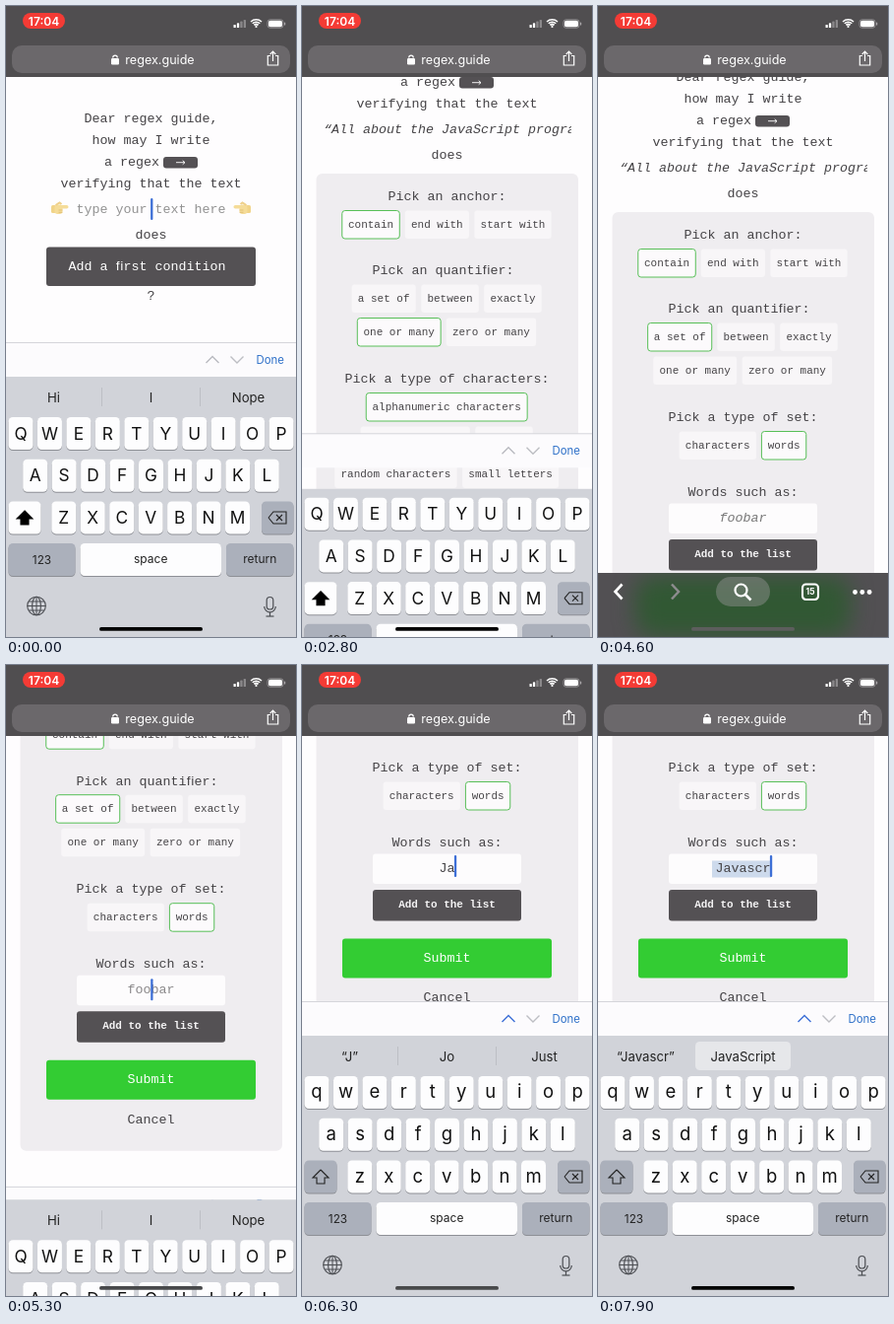
Recreate the animation shown at these times as an HTML page with a canvas. Size 295 by 640 pixels, loop 8 s.

```html
<!DOCTYPE html>
<html lang="en">
<head>
<meta charset="utf-8">
<title>Regex guide</title>
<style>
html, body { margin: 0; width: 100%; height: 100%; overflow: hidden; background: #fff; }
canvas { display: block; width: 295px; height: 640px; }
</style>
</head>
<body>
<canvas id="stage"></canvas>
<script>
const W = 295, H = 640, LOOP = 8000, MID = 147.5;
const MONO = '"Liberation Mono", "Courier New", monospace';
const SANS = 'Inter, "Liberation Sans", sans-serif';
const INK = '#454346', DARK = '#545154', GREEN = '#33cc33', BLUE = '#3d6fd6';
const canvas = document.getElementById('stage');
const dpr = window.devicePixelRatio || 1;
canvas.width = W * dpr;
canvas.height = H * dpr;
const c = canvas.getContext('2d');

const clamp = v => Math.min(1, Math.max(0, v));
function ease(t, from, to) {
  const p = clamp((t - from) / (to - from));
  return p * p * (3 - 2 * p);
}
const mix = (a, b, p) => a + (b - a) * p;

function box(x, y, w, h, r, fill, stroke, lw = 1) {
  c.beginPath();
  c.roundRect(x, y, w, h, r);
  if (fill) { c.fillStyle = fill; c.fill(); }
  if (stroke) { c.strokeStyle = stroke; c.lineWidth = lw; c.stroke(); }
}
function line(points, color, lw, fill) {
  c.beginPath();
  for (let i = 0; i < points.length; i += 2) c.lineTo(points[i], points[i + 1]);
  if (fill) { c.closePath(); c.fillStyle = fill; c.fill(); }
  if (color) { c.strokeStyle = color; c.lineWidth = lw; c.stroke(); }
}
function arc(x, y, r, from, to, color, lw) {
  c.beginPath();
  c.arc(x, y, r, from, to);
  c.strokeStyle = color;
  c.lineWidth = lw;
  c.stroke();
}
function dot(x, y, r, color) {
  c.beginPath();
  c.arc(x, y, r, 0, 7);
  c.fillStyle = color;
  c.fill();
}
function text(s, x, y, font, color, align) {
  c.font = font;
  c.fillStyle = color;
  c.textAlign = align || 'center';
  c.fillText(s, x, y);
}
const mono = (s, x, y, color = INK, style = '', size = 13.33, align) =>
  text(s, x, y + size * 0.29, `${style} ${size}px ${MONO}`, color, align);
const sans = (s, x, y, size, color, weight = 400) =>
  text(s, x, y + size * 0.36, `${weight} ${size}px ${SANS}`, color);
const caret = (x, y) => box(x - 1.1, y - 11, 2.3, 22, 1, BLUE);

// ---- timeline ----
const TYPED = [[5800, 'J'], [6200, 'Ja'], [6600, 'Jav'], [6900, 'Java'],
  [7200, 'Javas'], [7450, 'Javasc'], [7700, 'Javascr']];
const HINTS = [[0, ['Hi', 'I', 'Nope']], [5950, ['“J”', 'Jo', 'Just']],
  [6400, ['“Ja”', 'Just', 'Jazz']], [6750, ['“Jav”', 'Java', 'Have']],
  [7050, ['“Java”', 'JavaScript', '']], [7350, ['“Javas”', 'JavaScript', '']],
  [7550, ['“Javasc”', 'JavaScript', '']], [7800, ['“Javascr”', 'JavaScript', '']]];
const latest = (list, t, none) => list.reduce((v, [at, x]) => t >= at ? x : v, none);

function state(t) {
  const first = ease(t, 2450, 2700), back = ease(t, 2850, 3250), down = ease(t, 5100, 5450);
  return {
    t,
    scroll: mix(mix(mix(0, 81, first), 42, back), 355, down),
    keys: ease(t, 2652, 3052) - ease(t, 5135, 5535),
    bar: ease(t, 2950, 3250) - ease(t, 5050, 5250),
    menu: clamp((t - 950) / 100) * (1 - clamp((t - 1750) / 150)),
    pasted: t >= 1800,
    panel: t >= 2450,
    set: t >= 3700,
    words: t >= 4300,
    focus: t >= 5050,
    typed: latest(TYPED, t, ''),
    hints: latest(HINTS, t),
    lower: t >= 5800
  };
}

// ---- page ----
function hand(x, y, dir) {
  c.save();
  c.translate(x, y);
  c.scale(dir, 1);
  box(-8.5, -4, 5, 8, 1.5, '#f1d489');
  box(-5, -4.5, 8, 9.5, 3, '#f5dc98');
  box(-3, -4, 12, 3.6, 1.8, '#f5dc98');
  line([-4, -4, 0, -6.5, 2, -5], '#efd08a', 2);
  for (let i = 0; i < 2; i++) line([-1, 1 + i * 2.3, 3, 1 + i * 2.3], '#d9b566', 0.7);
  c.restore();
}
function row(labels, y, chosen) {
  const pad = 12.4, gap = 5.5, size = 10.98;
  const widths = labels.map(s => s.length * size * 0.6 + pad);
  let x = 147.2 - (widths.reduce((a, b) => a + b) + gap * (labels.length - 1)) / 2;
  labels.forEach((s, i) => {
    const on = s === chosen;
    box(x, y - 14.5, widths[i], 28.5, 3, on ? '#fcfafc' : '#f8f6f8', on && '#58bf58');
    mono(s, x + widths[i] / 2, y - 0.5, INK, '', size);
    x += widths[i] + gap;
  });
}
function textField(s) {
  if (!s.pasted) {
    mono('type your text here', MID, 206, '#929292');
    hand(54.5, 206, 1);
    hand(240.5, 206, -1);
    caret(148.2, 206);
    return;
  }
  c.save();
  c.beginPath();
  c.rect(21, 194, 253, 24);
  c.clip();
  const title = 'All about the JavaScript programming language';
  if (s.panel) mono('“' + title + '”', 22, 206, INK, 'italic', 13.33, 'left');
  else {
    mono(title, 270, 206, INK, '', 13.33, 'right');
    caret(272, 206);
  }
  c.restore();
}
function wordField(s) {
  box(72, 546.5, 151, 30.5, 3, '#fdfcfd');
  if (!s.typed) {
    mono('foobar', MID, 561, s.focus ? '#8a888a' : '#777', s.focus ? '' : 'italic');
    if (s.focus) caret(148.3, 561);
    return;
  }
  const half = s.typed.length * 4;
  if (s.t >= 7800) box(MID - half - 3.5, 553.5, half * 2 + 4, 17, 0, '#cddaec');
  mono(s.typed, MID, 561);
  caret(MID + half + 0.5, 559);
}
function panel(s) {
  const end = s.set ? 632.5 : 588;
  box(14.5, 251, 266.5, end + 92 - 251, 6, '#efedf0');
  mono('Pick an anchor:', MID, 274);
  row(['contain', 'end with', 'start with'], 303, 'contain');
  mono('Pick an quantiﬁer:', 143.5, 349.5);
  const pick = s.set ? 'a set of' : 'one or many';
  row(['a set of', 'between', 'exactly'], 378, pick);
  row(['one or many', 'zero or many'], 412, pick);
  if (s.set) {
    mono('Pick a type of set:', MID, 459);
    row(['characters', 'words'], 488, s.words ? 'words' : 'characters');
    mono(s.words ? 'Words such as:' : 'Characters such as:', MID, 535);
    wordField(s);
    box(72, 583, 151, 31.5, 3, DARK);
    mono('Add to the list', MID, 598, '#f4f3f4', 'bold', 10.98);
  } else {
    mono('Pick a type of characters:', MID, 459);
    row(['alphanumeric characters'], 488, 'alphanumeric characters');
    row(['capital letters', 'numbers'], 522, '');
    row(['random characters', 'small letters'], 556, '');
  }
  box(41, end, 213, 40, 3, GREEN);
  mono('Submit', MID, end + 19.5, '#fff');
  mono('Cancel', MID, end + 60);
}
function page(s) {
  c.save();
  c.translate(0, -s.scroll);
  mono('Dear regex guide,', MID, 114);
  mono('how may I write', MID, 136);
  mono('a regex', 128, 158.5);
  box(160, 153, 35, 11.5, 3, DARK);
  line([173, 158.7, 182, 158.7], '#fff', 0.9);
  line([179.7, 156.7, 182, 158.7, 179.7, 160.7], '#fff', 0.9);
  mono('verifying that the text', MID, 180.5);
  textField(s);
  mono('does', MID, 232.5);
  if (s.panel) panel(s);
  else {
    box(41, 244.5, 213, 39.5, 3, DARK);
    mono('Add a ﬁrst condition', 143.5, 264, '#fff');
    mono('?', MID, 294.5);
  }
  c.restore();
}
function menu(alpha) {
  if (alpha <= 0) return;
  c.globalAlpha = alpha;
  box(84, 152, 129.5, 29, 7, '#1e1e20');
  line([140.5, 180.5, 148.3, 187.5, 156, 180.5], null, 0, '#1e1e20');
  line([158.5, 152, 158.5, 181], '#77777a', 0.8);
  sans('Select All', 121, 166.5, 10.8, '#fff', 500);
  sans('Paste', 186, 166.5, 10.8, '#fff', 500);
  c.globalAlpha = 1;
}

// ---- browser ----
function header() {
  box(0, 0, W, 72, 0, '#504e50');
  box(17, 7, 43, 16, 8, '#f43b35');
  sans('17:04', 38.5, 15.2, 12, '#fff', 600);
  for (let i = 0; i < 4; i++)
    box(231.5 + i * 3.4, 19 - i * 1.7, 2.3, 3 + i * 1.7, 0.6, i < 2 ? '#fff' : '#8b898b');
  arc(254.5, 21.5, 2.8, -2.35, -0.79, '#fff', 2);
  arc(254.5, 21.5, 5.3, -2.35, -0.79, '#fff', 1.6);
  arc(254.5, 21.5, 7.8, -2.35, -0.79, '#fff', 1.5);
  dot(254.5, 21, 1.1, '#fff');
  box(266, 13.8, 16, 8.4, 2.6, null, '#a9a7a9', 0.7);
  box(267, 14.8, 14, 6.4, 1.8, '#fff');
  box(283, 16.5, 1.2, 3, 0.6, '#a9a7a9');
  box(6, 40, 283, 28, 10, '#6b686b');
  box(107, 53, 8, 6.5, 1.2, '#fff');
  arc(111, 52.5, 2.3, Math.PI, 0, '#fff', 1.2);
  sans('regex.guide', 156.5, 54, 12.6, '#fff');
  line([269, 50.5, 266.3, 50.5, 266.3, 60, 276.7, 60, 276.7, 50.5, 274, 50.5], '#fff', 1.2);
  line([271.5, 56, 271.5, 46.5], '#fff', 1.2);
  line([268.7, 49, 271.5, 46.2, 274.3, 49], '#fff', 1.2);
}
function toolbar(s) {
  if (s.bar <= 0) return;
  c.save();
  c.translate(0, 65 * (1 - s.bar));
  c.beginPath();
  c.rect(0, 575, W, 65);
  c.clip();
  box(0, 575, W, 65, 0, '#525053');
  // the submit button glows through the bar
  c.save();
  c.filter = 'blur(11px)';
  c.globalAlpha = 0.8;
  box(38, (s.set ? 620 : 576) - s.scroll, 219, 62, 20, '#2a5a2c');
  c.restore();
  line([24.5, 586.5, 17.5, 594, 24.5, 601.5], '#fff', 2.7);
  line([75, 586.5, 82, 594, 75, 601.5], '#8d8c8e', 2.5);
  box(120, 579, 55, 30, 15, 'rgba(150,150,150,.45)');
  arc(145.5, 592.5, 6, 0, 7, '#fff', 2.2);
  line([150, 597, 155.5, 602.5], '#fff', 2.6);
  box(208, 586.5, 16, 15.5, 3.5, null, '#fff', 2.1);
  sans('15', 216, 594.3, 8.5, '#fff', 700);
  for (let i = 0; i < 3; i++) dot(261.5 + i * 7.3, 594.5, 2.4, '#fff');
  c.restore();
}

// ---- keyboard ----
function key(x, y, w, fill) {
  box(x, y + 1, w, 33, 4.5, '#8e9096');
  box(x, y, w, 33, 4.5, fill);
}
function accessory(s, y) {
  const on = s.focus ? BLUE : '#b9bac0';
  box(0, y, W, 34.5, 0, '#fcfbfd');
  line([0, y, W, y], '#d5d5da', 1);
  line([203.5, y + 20.5, 210, y + 14, 216.5, y + 20.5], on, 1.4);
  line([228.5, y + 14, 235, y + 20.5, 241.5, y + 14], '#bdbec3', 1.4);
  sans('Done', 268.7, y + 17.3, 11.4, '#2e70c8');
}
function hints(s) {
  const chosen = s.t >= 7800;
  if (chosen) box(99, 382, 97, 29, 4.5, '#e6e7ea');
  else for (const x of [97.5, 197.5]) line([x, 387, x, 406], '#bcbfc5', 1);
  s.hints.forEach((h, i) => sans(h, 48.5 + i * 99, 397, 13.2, '#222'));
}
function letters(s) {
  const rows = ['QWERTYUIOP', 'ASDFGHJKL', 'ZXCVBNM'], left = [15, 29.7, 58.8];
  rows.forEach((r, j) => [...r].forEach((ch, i) => {
    const x = left[j] + i * 29.45, y = 417 + j * 42.7;
    key(x - 12.5, y, 25, '#fdfdfe');
    if (s.lower) sans(ch.toLowerCase(), x, y + 15.5, 18.5, '#111');
    else sans(ch, x, y + 16.5, 17.3, '#111');
  }));
}
function keyboard(s) {
  if (s.keys >= 0.999) return;
  const off = s.keys * 264, gray = '#abb0bb';
  const closing = !s.focus && s.keys > 0;
  accessory(s, 341.5 + off * 1.13);
  c.save();
  c.translate(0, off);
  box(0, closing ? 408 : 376, W, 300, 0, '#d1d3d9');
  if (!closing) hints(s);
  letters(s);
  key(2.5, 502.5, 33, s.lower ? gray : '#fdfdfe');
  line([19, 512, 27, 520, 23, 520, 23, 526, 15, 526, 15, 520, 11, 520, 19, 512],
    s.lower ? '#222' : '#000', 1.1, s.lower ? null : '#000');
  key(260, 502.5, 32.5, gray);
  line([267, 519, 272, 513, 285, 513, 285, 525, 272, 525, 267, 519], '#222', 1.1);
  line([275, 516, 281, 522], '#222', 1.1);
  line([281, 516, 275, 522], '#222', 1.1);
  key(2.5, 545, 68, gray);
  key(75.5, 545, 143.5, '#fdfdfe');
  key(224, 545, 68.5, gray);
  sans('123', 36.5, 561.5, 11.8, '#222');
  sans('space', 147.2, 560.5, 12, '#222');
  sans('return', 258.3, 560.5, 12, '#222');
  // globe and microphone
  const ink = '#4b4d52';
  arc(31, 608.5, 9.3, 0, 7, ink, 1.1);
  c.beginPath();
  c.ellipse(31, 608.5, 4.4, 9.3, 0, 0, 7);
  c.stroke();
  line([31, 599, 31, 618], ink, 1);
  for (const [d, w] of [[-4.5, 8], [0, 9.3], [4.5, 8]])
    line([31 - w, 608.5 + d, 31 + w, 608.5 + d], ink, 1);
  box(265.2, 599.5, 6.6, 12.5, 3.3, null, ink, 1.2);
  arc(268.5, 609, 5.8, 0, Math.PI, ink, 1.2);
  line([268.5, 615, 268.5, 619], ink, 1.2);
  line([264.5, 619, 272.5, 619], ink, 1.2);
  c.restore();
}

function draw(now) {
  const s = state(now % LOOP);
  c.setTransform(dpr, 0, 0, dpr, 0, 0);
  box(0, 0, W, H, 0, '#fefdfe');
  page(s);
  menu(s.menu);
  toolbar(s);
  keyboard(s);
  header();
  const home = s.bar > 0.5 ? '#5d5e5d' : s.focus && s.t < 7300 ? '#48494b' : '#050505';
  box(95, 630, 105, 3.8, 1.9, home);
}
let start;
function tick(now) {
  if (start === undefined) start = now;
  draw(now - start);
  requestAnimationFrame(tick);
}
draw(0);
requestAnimationFrame(tick);
</script>
</body>
</html>
```
